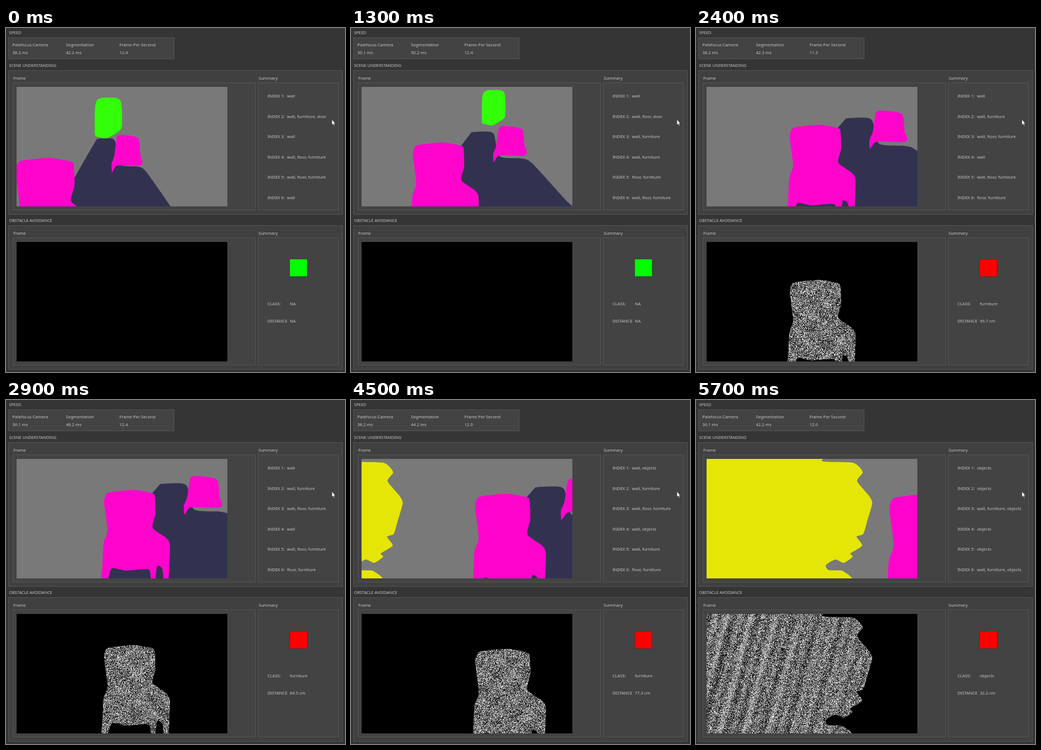
Animation of 608x619 px, one loop 5.8 s. Source, as an HTML page with a canvas:

```html
<!DOCTYPE html>
<html lang="en">
<head>
<meta charset="utf-8">
<title>Scene understanding</title>
<style>
html, body { margin: 0; width: 100%; height: 100%; overflow: hidden; background: #353535; }
svg, canvas { position: absolute; left: 0; top: 0; }
canvas { left: 19px; }
#scene { top: 106px; }
#depth { top: 385px; }
text { font-family: "Noto Sans", "Open Sans", sans-serif; font-size: 7.6px; fill: #c6c6c6; white-space: pre; }
.head { font-size: 7.25px; }
.panel { stroke: #545454; }
</style>
</head>
<body>
<svg id="ui" width="608" height="619"></svg>
<canvas id="scene" width="378" height="215"></canvas>
<canvas id="depth" width="378" height="215"></canvas>
<script>
const LOOP = 5800, STEP = 100, LEFT = 19, TOP = 106, W = 378, H = 215;
const classes = [
  ['wall', [121, 121, 121]], ['floor', [50, 50, 80]], ['furniture', [255, 5, 204]],
  ['door', [51, 255, 8]], ['objects', [230, 230, 6]]
];
const [WALL, FLOOR, FURNITURE, DOOR, OBJECT] = classes.map(c => `rgb(${c[1]})`);
const ui = document.getElementById('ui');
const scene = document.getElementById('scene').getContext('2d', { willReadFrequently: true });
const depth = document.getElementById('depth').getContext('2d');

// ---------- interface ----------
function add(tag, attrs, text = '') {
  const el = document.createElementNS('http://www.w3.org/2000/svg', tag);
  for (const k in attrs) el.setAttribute(k, attrs[k]);
  el.textContent = text;
  return ui.appendChild(el);
}
const label = (x, y, text, cls = '') => add('text', { x, y, class: cls }, text);
const panel = (x, y, width, height, fill) =>
  add('rect', { x: x + .5, y: y + .5, width, height, fill, class: 'panel' });

panel(4, 17, 297, 38, '#434343');
for (const y of [76, 355]) {
  panel(4, y, 599, 259, '#404040');
  panel(12, y + 22, 435, 229, '#434343');
  panel(452, y + 22, 144, 229, '#434343');
  label(13, y + 16.5, 'Frame');
  label(453, y + 16.5, 'Summary');
}
label(5.5, 11, 'SPEED', 'head');
label(5.5, 70, 'SCENE UNDERSTANDING', 'head');
label(5.5, 349, 'OBSTACLE AVOIDANCE', 'head');
const speedText = ['Palefocus Camera', 'Segmentation', 'Frame Per Second'].map((name, i) => {
  label(11.5 + 96 * i, 33, name);
  return label(11.5 + 96 * i, 47, '');
});
const indexText = Array.from({ length: 6 }, (_, i) => {
  const y = 125.2 + 36.5 * i;
  label(469, y, `INDEX ${i + 1}:`);
  return label(504, y, '');
});
label(469, 498.5, 'CLASS:');
label(469, 529.5, 'DISTANCE');
const classText = label(509, 498.5, ''), distText = label(509, 529.5, '');
const lamp = add('rect', { x: 509, y: 416, width: 31, height: 31,
  stroke: '#000', 'stroke-opacity': .45, 'stroke-dasharray': '2 2' });
add('path', { d: 'M584.5 164.5v10l2.2-2 1.5 3.5 1.5-.7-1.5-3.3h2.6z',
  fill: '#fff', stroke: '#111', 'stroke-width': .5 });

// ---------- motion ----------
const lerp = (a, b, k) => a + (b - a) * k;
const clamp = v => Math.min(1, Math.max(0, v));
function tween(keys, t) {
  const n = keys.findIndex(k => k[0] > t);
  if (n < 1) return keys.at(n).slice(1);
  const a = keys[n - 1], b = keys[n], k = (t - a[0]) / (b[0] - a[0]);
  return a.slice(1).map((v, i) => lerp(v, b[i + 1], k));
}
// Near chair's top left corner and size: time, x, y, scale
const camera = [
  [0, 17, 235, 1.15], [1300, 111, 207, 1], [2000, 162, 185, 1], [2900, 176, 163, 1],
  [3800, 175, 168, 1], [4100, 179, 169, 1], [5100, 288, 171, 1.19], [5700, 347, 171, 1.25]
];
const objectShift = [[4200, -245], [5100, 0], [5700, 60]];
const distance = [[2300, 102.7], [2900, 84.5], [3800, 113.6], [5100, 46.1], [5700, 32.2]];

// ---------- outlines ----------
const points = s => s.split(' ').map(p => p.split(',').map(Number));
const chair = points('-5,165 -3,135 -1,95 6,72 0,22 3,8 11,3 53,-1 87,5 91,12 92,42 87,67 111,85 118,100 115,165 108,165 104,140 95,136 91,165 84,165 80,142 40,144 14,140 5,165');
const farChair = points('1,69 0,53 6,38 12,3 26,0 59,6 64,38 69,51 61,57 16,56 8,59');
const ground = points('-85,260 -85,110 -53,64 -7,4 0,-1 30,-2 41,4 52,45 95,49 115,58 178,125 300,260');
const doorway = points('-21,25 -21,-15 -18,-28 -10,-32 12,-32 19,-27 21,-12 21,12 17,20 -2,31 -16,29');
const objectEdge = points('-150,90 164,90 166,110 222,113 239,130 229,146 250,172 256,186 247,218 240,241 228,246 238,262 217,276 221,282 205,293 190,287 173,297 178,306 204,308 202,330 -150,330');

// Smooth closed curve through the points
function curve(pts) {
  const path = new Path2D(), n = pts.length, at = i => pts[(i + n) % n], ease = 1 / 9;
  path.moveTo(...pts[0]);
  for (let i = 0; i < n; i++) {
    const [a, b, c, d] = [at(i - 1), at(i), at(i + 1), at(i + 2)];
    path.bezierCurveTo(b[0] + (c[0] - a[0]) * ease, b[1] + (c[1] - a[1]) * ease,
      c[0] - (d[0] - b[0]) * ease, c[1] - (d[1] - b[1]) * ease, ...c);
  }
  return path;
}

function layersAt(t) {
  const [x, y, s] = tween(camera, t);
  const near = clamp((x - 17) / 158), eased = near * (2 - near);
  const size = clamp((2200 - t) / 700);
  const place = (pts, dx, dy, sx = 1, sy = 1) => curve(pts.map(([px, py]) =>
    [x + s * (dx + px * sx) - LEFT, y + s * (dy + py * sy) - TOP]));
  const [shift] = tween(objectShift, t);
  return {
    floor: place(ground, lerp(129, 104, eased), lerp(-30, -11, near), lerp(.65, 1.1, near), lerp(.87, 1, near)),
    door: place(doorway, lerp(124, 145, size), lerp(-36, -63, size), size, size),
    far: place(farChair, lerp(150, 143, eased), lerp(-37, -26, near), lerp(.7, 1, near), lerp(.85, 1, near)),
    chair: place(chair, 0, 0),
    object: curve(objectEdge.map(([px, py]) => [px + shift - LEFT, py - TOP]))
  };
}

// ---------- depth grain ----------
const grain = document.createElement('canvas');
grain.width = W;
grain.height = H;
const grainCtx = grain.getContext('2d');
function random(seed) {
  let a = seed * 7919 + 17;
  return () => {
    a = a + 0x6D2B79F5 | 0;
    let r = Math.imul(a ^ a >>> 15, 1 | a);
    r = r + Math.imul(r ^ r >>> 7, 61 | r) ^ r;
    return ((r ^ r >>> 14) >>> 0) / 4294967296;
  };
}
function makeGrain(seed, striped) {
  const img = grainCtx.createImageData(W, H), rnd = random(seed);
  for (let i = 0; i < W * H; i++) {
    const x = i % W, y = Math.floor(i / W), p = x + .27 * y;
    const dark = .42 + (striped
      ? (.2 * Math.sin(p * .29) + .13 * Math.sin(p * .13 + 1)) * (1 - x / 500)
      : .12 * Math.sin(x * .11) * Math.sin(y * .13));
    const v = rnd() < dark ? rnd() * 70 : 85 + rnd() * 170;
    img.data.set([v, v, v, 255], i * 4);
  }
  grainCtx.putImageData(img, 0, 0);
}

// ---------- readings ----------
const speeds = ['38.2 42.2 12.4', '30.1 48.2 12.0', '30.1 50.2 12.4', '38.2 42.3 11.3', '30.1 48.2 12.4',
  '30.1 40.4 12.7', '38.2 44.2 12.0', '30.1 50.2 12.4', '30.1 42.2 12.0'];

// Each index lists the classes that cover a fair part of one cell in a 3 by 2 grid
function summaries() {
  const { data } = scene.getImageData(0, 0, W, H);
  const w = W / 3, h = Math.floor(H / 2);
  return indexText.map((_, cell) => {
    const x0 = cell % 3 * w, y0 = Math.floor(cell / 3) * h, count = classes.map(() => 0);
    for (let y = y0; y < y0 + h; y += 2) for (let x = x0; x < x0 + w; x += 2) {
      const i = (y * W + x) * 4;
      const n = classes.findIndex(([, c]) => c.every((v, j) => v === data[i + j]));
      if (n >= 0) count[n]++;
    }
    return classes.filter((_, n) => count[n] * 4 > w * h * .05).map(c => c[0]).join(', ');
  });
}

function draw(t) {
  const layers = layersAt(t);
  const fill = (path, color) => { scene.fillStyle = color; scene.fill(path); };
  scene.fillStyle = WALL;
  scene.fillRect(0, 0, W, H);
  fill(layers.floor, FLOOR);
  fill(layers.door, DOOR);
  fill(layers.far, FURNITURE);
  fill(layers.chair, FURNITURE);
  fill(layers.object, OBJECT);

  const blocked = t >= 2300, byObject = t >= 4600;
  depth.fillStyle = '#000';
  depth.fillRect(0, 0, W, H);
  if (blocked) {
    makeGrain(t / STEP, byObject);
    depth.save();
    depth.clip(byObject ? layers.object : layers.chair);
    depth.drawImage(grain, 0, 0);
    depth.restore();
  }

  speeds[Math.floor(t / 650)].split(' ').forEach((v, i) => speedText[i].textContent = v + (i < 2 ? ' ms' : ''));
  summaries().forEach((v, i) => indexText[i].textContent = v);
  classText.textContent = !blocked ? 'NA' : byObject ? 'objects' : 'furniture';
  distText.textContent = blocked ? tween(distance, t)[0].toFixed(1) + ' cm' : 'NA';
  lamp.setAttribute('fill', blocked ? '#f00' : '#0f0');
}

let last = -1;
const start = performance.now();
function tick(now) {
  const t = Math.floor(Math.max(0, now - start) % LOOP / STEP) * STEP;
  if (t !== last) draw(last = t);
  requestAnimationFrame(tick);
}
draw(0);
requestAnimationFrame(tick);
</script>
</body>
</html>
```
